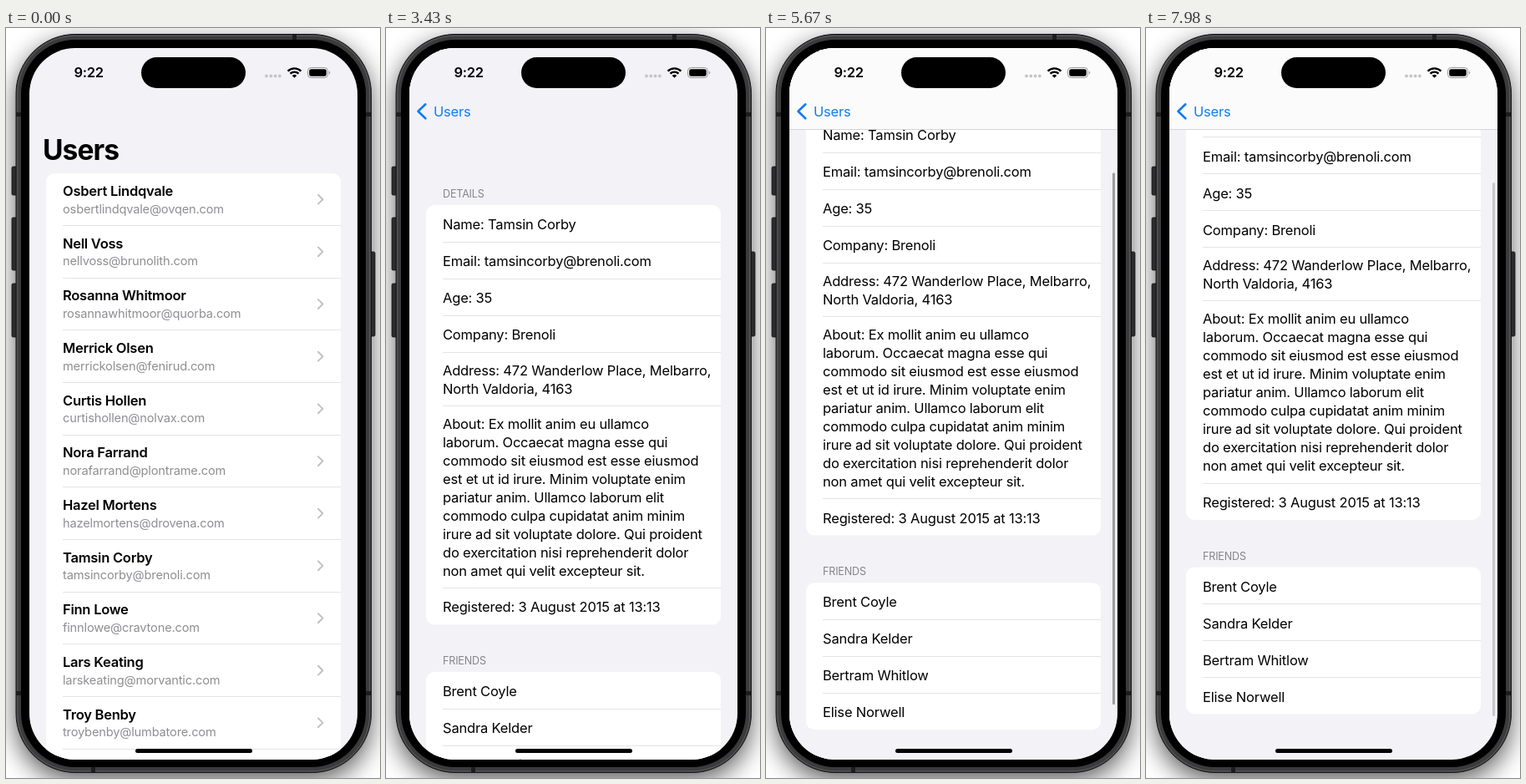
These frames come from a looping animation (448x898 px, 8000 ms). An HTML page:

```html
<!DOCTYPE html>
<html lang="en">
<head>
<meta charset="utf-8">
<title>Users</title>
<style>
  html, body { margin: 0; width: 100%; height: 100%; overflow: hidden; background: #fff; }
  svg { display: block; width: 100%; height: 100%; }
  text { font: 16.5px Inter, Roboto, sans-serif; letter-spacing: -.011em; white-space: pre; }
  .bold { font-weight: 600; letter-spacing: -.015em; }
  .mail { font-size: 14.6px; fill: #8e8e92; }
  .head { font-size: 12.5px; fill: #85858a; }
  .large { font-size: 33.5px; font-weight: 700; letter-spacing: -.028em; }
  .sep { fill: #e4e4e6; shape-rendering: crispEdges; }
  .chevron { fill: none; stroke: #c2c2c5; stroke-width: 2; stroke-linecap: round; stroke-linejoin: round; }
  .bar { fill: #9d9da0; }
</style>
</head>
<body>
<svg viewBox="0 0 448 898">
  <defs>
    <filter id="blur" x="-30%" y="-20%" width="160%" height="140%"><feGaussianBlur stdDeviation="15"/></filter>
    <clipPath id="screen"><rect x="28" y="24" width="393" height="852" rx="55"/></clipPath>
  </defs>

  <rect width="448" height="898" fill="#fff"/>
  <rect x="12" y="17" width="425" height="884" rx="70" opacity=".65" filter="url(#blur)"/>
  <g fill="#2c2c2e" stroke="#111" stroke-width=".8">
    <rect x="7" y="166" width="8" height="34" rx="1.5"/>
    <rect x="7" y="227" width="8" height="63" rx="1.5"/>
    <rect x="7" y="306" width="8" height="64" rx="1.5"/>
    <rect x="434" y="268" width="8" height="101" rx="1.5"/>
  </g>
  <rect x="12" y="7.5" width="425.5" height="884" rx="71" fill="#3b3b3d" stroke="#151516"/>
  <rect x="13.8" y="9.3" width="422" height="880.5" rx="69" fill="none" stroke="#626264" stroke-width=".9"/>
  <g fill="#1d1d1f">
    <rect x="12" y="101" width="6" height="5"/><rect x="431" y="101" width="6" height="5"/>
    <rect x="12" y="794" width="6" height="5"/><rect x="431" y="794" width="6" height="5"/>
    <rect x="343" y="8" width="5" height="6"/><rect x="102" y="885" width="5" height="6"/>
  </g>
  <rect x="18" y="14" width="413" height="871" rx="65"/>

  <g clip-path="url(#screen)">
    <g id="listPage">
      <rect x="28" y="24" width="393" height="852" fill="#f2f2f7"/>
      <g id="list"></g>
      <g id="listNav">
        <rect x="28" y="24" width="393" height="97" fill="#fbfbfb"/>
        <rect class="sep" x="28" y="121" width="393" height="1" style="fill:#d6d6d8"/>
      </g>
      <rect id="listBar" class="bar" x="415" width="3" height="117" rx="1.5"/>
      <rect id="dim" x="28" y="24" width="393" height="852"/>
    </g>
    <g id="detailPage">
      <rect x="28" y="24" width="393" height="852" fill="#f2f2f7"/>
      <g id="detail"></g>
      <g id="detailNav">
        <rect x="28" y="24" width="393" height="97" fill="#fbfbfb"/>
        <rect class="sep" x="28" y="121" width="393" height="1" style="fill:#d6d6d8"/>
      </g>
      <rect id="detailBar" class="bar" x="415" width="3" rx="1.5"/>
    </g>

    <text id="title" class="bold" y="106" text-anchor="middle">Users</text>
    <path id="backArrow" d="M47.3 91.3l-8.8 8.5 8.8 8.5" fill="none" stroke="#147bf0" stroke-width="2.6" stroke-linecap="round" stroke-linejoin="round"/>
    <text id="backLabel" y="106" fill="#147bf0">Users</text>

    <text class="bold" x="81.5" y="59">9:22</text>
    <rect x="162" y="35" width="125" height="37" rx="18.5"/>
    <g fill="#c5c5c9">
      <circle cx="312" cy="57.5" r="1.9"/><circle cx="317.3" cy="57.5" r="1.9"/>
      <circle cx="322.6" cy="57.5" r="1.9"/><circle cx="327.9" cy="57.5" r="1.9"/>
    </g>
    <g fill="none" stroke="#000" stroke-width="2.4">
      <path d="M337.6 51.6a11.2 11.2 0 0 1 15.8 0"/>
      <path d="M340.5 54.7a7.1 7.1 0 0 1 10 0"/>
    </g>
    <path d="M342.7 57a4 4 0 0 1 5.6 0l-2.8 2.8z"/>
    <rect x="361.5" y="47.5" width="24" height="12" rx="3.8" fill="none" stroke="#9a9a9c"/>
    <rect x="363.2" y="49.2" width="20.6" height="8.6" rx="2.4"/>
    <path d="M387 51.5a2.2 2.2 0 0 1 0 4z" fill="#9a9a9c"/>
    <rect x="155" y="863" width="140" height="5" rx="2.5"/>
  </g>
</svg>

<script>
const $ = id => document.getElementById(id);

const people = [
  ['Osbert Lindqvale', 'ovqen'], ['Nell Voss', 'brunolith'], ['Rosanna Whitmoor', 'quorba'],
  ['Merrick Olsen', 'fenirud'], ['Curtis Hollen', 'nolvax'], ['Nora Farrand', 'plontrame'],
  ['Hazel Mortens', 'drovena'], ['Tamsin Corby', 'brenoli'], ['Finn Lowe', 'cravtone'],
  ['Lars Keating', 'morvantic'], ['Troy Benby', 'lumbatore'], ['Celia Brandton', 'glemtor'],
  ['Harrison Belmora', 'vuzo'], ['Wanda Thornfield', 'umbrelix'], ['Logan Dalsen', 'ostrel'],
  ['Rosalind Tarver', 'yondar'], ['Nelson Etchevaz', 'kelphona'], ['Greta Holm', 'stravindo']
];
const mail = ([name, domain]) => `${name.toLowerCase().replace(' ', '')}@${domain}.com`;
const user = people[7];

const fields = [
  [`Name: ${user[0]}`],
  [`Email: ${mail(user)}`],
  ['Age: 35'],
  ['Company: Brenoli'],
  ['Address: 472 Wanderlow Place, Melbarro,', 'North Valdoria, 4163'],
  ['About: Ex mollit anim eu ullamco', 'laborum. Occaecat magna esse qui',
   'commodo sit eiusmod est esse eiusmod', 'est et ut id irure. Minim voluptate enim',
   'pariatur anim. Ullamco laborum elit', 'commodo culpa cupidatat anim minim',
   'irure ad sit voluptate dolore. Qui proident', 'do exercitation nisi reprehenderit dolor',
   'non amet qui velit excepteur sit.'],
  ['Registered: 3 August 2015 at 13:13']
];
const friends = [['Brent Coyle'], ['Sandra Kelder'], ['Bertram Whitlow'], ['Elise Norwell']];

const text = (x, y, content, cls = '') => `<text class="${cls}" x="${x}" y="${y}">${content}</text>`;
const card = (y, h) => `<rect x="48" y="${y}" width="353" height="${h}" rx="10" fill="#fff"/>`;
const separator = y => `<rect class="sep" x="68" y="${y - .3}" width="333" height="1"/>`;

function userRow(person, i) {
  const y = 174 + i * 62.67;
  return text(68, y + 27, person[0], 'bold') + text(68, y + 47.5, mail(person), 'mail') +
    `<path class="chevron" d="M374 ${y + 25.8}l5.4 5.4-5.4 5.4"/>` + separator(y + 62.3);
}

// Rows are 44 high for one line, and 20 plus 22 per line for more.
function section(heading, top, rows) {
  let y = top, body = '';
  rows.forEach((lines, i) => {
    const height = lines.length > 1 ? 20.2 + 22 * lines.length : 44;
    const first = y + (lines.length > 1 ? 27.6 : 29);
    lines.forEach((line, k) => body += text(68, first + 22 * k, line));
    y += height;
    if (i < rows.length - 1) body += separator(y);
  });
  return text(68, top - 9, heading, 'head') + card(top, y - top) + body;
}

$('list').innerHTML = text(44, 158, 'Users', 'large') + card(174, 2000) + people.map(userRow).join('');
$('detail').innerHTML = section('DETAILS', 212, fields) + section('FRIENDS', 771, friends);

const clamp = x => Math.min(1, Math.max(0, x));
const smooth = x => x * x * (3 - 2 * x);
const spring = x => x > 0 ? 1 - (1 + x) * Math.exp(-x) : 0;
const navAlpha = scroll => clamp((scroll - 40) / 12);

const listScroll = t => 320.7 * smooth(clamp((t - 980) / 910) ** .58);
const push = t => t >= 3430 ? 1 : spring((t - 2846) / 1000 * 14);
const detailScroll = t =>
  155.5 * smooth(clamp((t - 4690) / 1470) ** 1.15) - 30 * spring((t - 6160) / 1000 * 16);

function set(id, attributes) {
  for (const key in attributes) $(id).setAttribute(key, attributes[key]);
}
const move = (x, y) => ({ transform: `translate(${x} ${y})` });

function draw(t) {
  const p = push(t), s = listScroll(t), d = detailScroll(t);

  set('listPage', move(-118 * p, 0));
  set('list', move(0, -s));
  set('listNav', { opacity: navAlpha(s) });
  set('listBar', { y: 176 - Math.min(s, 52) + .165 * Math.max(0, s - 52), opacity: t >= 1050 ? 1 : 0 });
  set('dim', { opacity: .1 * p });

  set('detailPage', move(393 * (1 - p), 0));
  set('detail', move(0, -d));
  set('detailNav', { opacity: navAlpha(d) });
  const over = Math.max(0, d - 125.5), within = d - over - 39;
  const top = 130 + .636 * within + over;
  set('detailBar', {
    y: top,
    height: 760 + .74 * within - top,
    opacity: t < 4760 ? 0 : clamp(1 - (t - 7840) / 280)
  });

  set('title', { x: 224.6 - 118 * p, opacity: navAlpha(s) * clamp(1 - 2 * p) });
  set('backArrow', { opacity: p });
  set('backLabel', { x: 57 + 118 * (1 - p), opacity: p * p });
}

const start = performance.now();
function tick() {
  const t = (performance.now() - start) % 8000;
  draw(Math.floor(t / 70) * 70);
  requestAnimationFrame(tick);
}
tick();
</script>
</body>
</html>
```
